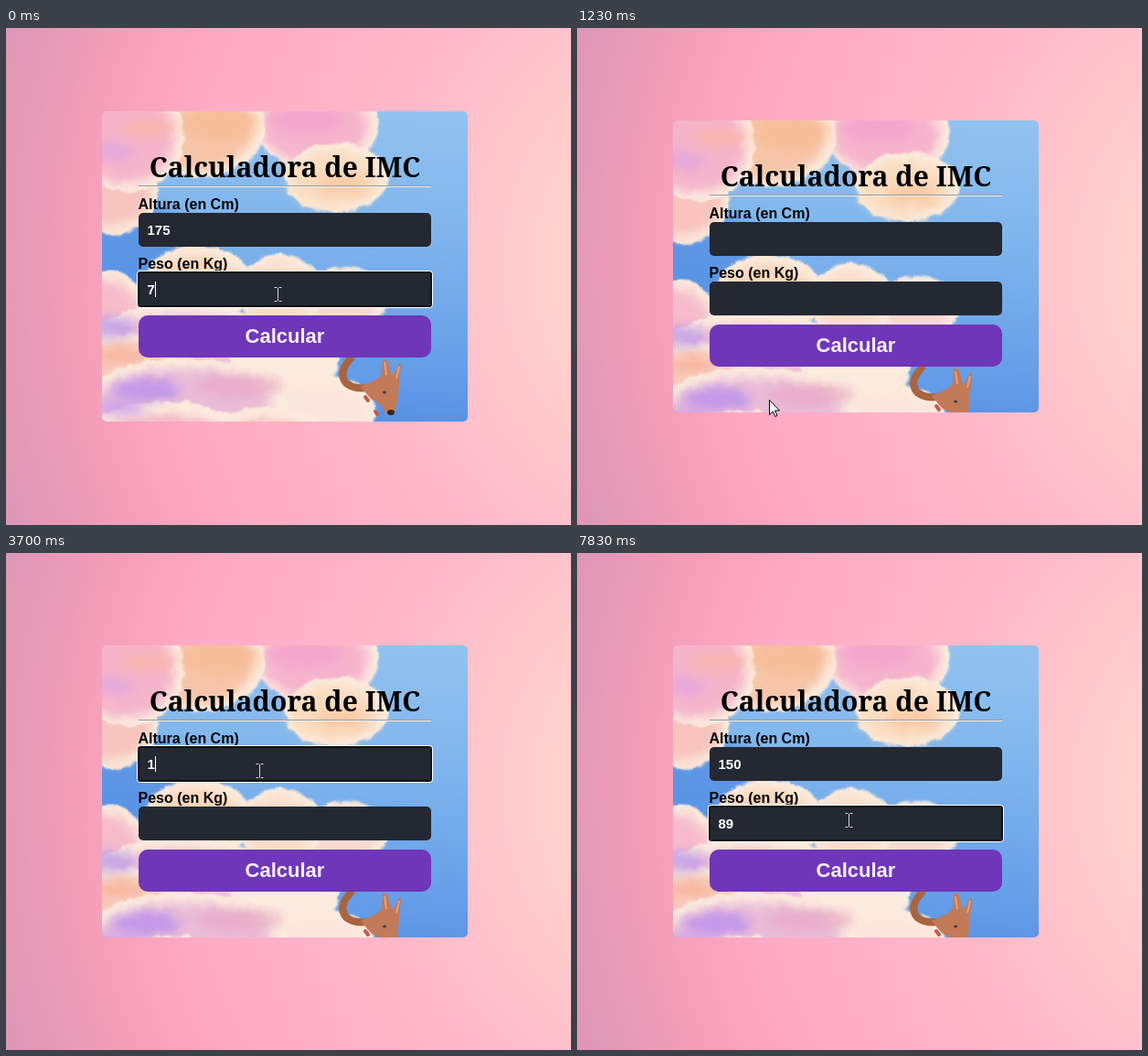
Animation, 618 px wide and 543 px high, one loop 8 s. Source, as an HTML page:

```html
<!DOCTYPE html>
<html lang="pt">
<head>
<meta charset="utf-8">
<title>Calculadora de IMC</title>
<style>
  html, body { margin: 0; width: 100%; height: 100%; overflow: hidden; }
  svg { display: block; width: 618px; height: 543px; }
  text { font: bold 16px "Liberation Sans", Arial, sans-serif; }
  .title { font: bold 30px "Noto Serif", serif; }
  .entry { font-size: 15px; fill: #fff; }
  .calc { font-size: 22px; fill: #f6f0fd; }
  .result { font-size: 20px; fill: #fff; }
  .reset { font-size: 13px; fill: #ffe9ff; }
</style>
</head>
<body>
<svg viewBox="0 0 618 543">
  <defs>
    <radialGradient id="page" gradientUnits="userSpaceOnUse" cx="800" cy="260" r="840">
      <stop offset=".2" stop-color="#ffd4d0"/>
      <stop offset=".31" stop-color="#ffcacc"/>
      <stop offset=".48" stop-color="#ffb8ca"/>
      <stop offset=".71" stop-color="#ffacc5"/>
      <stop offset=".81" stop-color="#fba2bc"/>
      <stop offset=".88" stop-color="#f09db8"/>
      <stop offset="1" stop-color="#dc97b5"/>
    </radialGradient>
    <linearGradient id="sky" x1=".8" y1="0" x2=".75" y2="1">
      <stop offset="0" stop-color="#92c2ef"/>
      <stop offset=".3" stop-color="#80b6ed"/>
      <stop offset=".7" stop-color="#629be7"/>
      <stop offset="1" stop-color="#427fdc"/>
    </linearGradient>
    <filter id="brush" x="-5%" y="-5%" width="110%" height="110%">
      <feTurbulence type="fractalNoise" baseFrequency=".07" numOctaves="3" seed="4"/>
      <feDisplacementMap in="SourceGraphic" scale="8" xChannelSelector="R" yChannelSelector="G"/>
    </filter>
    <filter id="soft" x="-40%" y="-40%" width="180%" height="180%"><feGaussianBlur stdDeviation="6"/></filter>
    <filter id="edge" x="-10%" y="-10%" width="120%" height="120%"><feGaussianBlur stdDeviation="1.2"/></filter>
    <clipPath id="frame"><rect id="frameBox" width="400" height="319" rx="5"/></clipPath>
  </defs>

  <rect width="618" height="543" fill="url(#page)"/>

  <g id="card">
    <g clip-path="url(#frame)">
      <rect width="400" height="420" fill="url(#sky)"/>
      <ellipse cx="20" cy="150" rx="90" ry="50" fill="#5590e4" opacity=".8" filter="url(#soft)"/>
      <g id="clouds" filter="url(#brush)"></g>
      <path d="M274 268Q257 285 267 297Q276 304 290 302" fill="none" stroke="#a9653f" stroke-width="8"/>
      <path d="M283 301L300 293L306 288L307 272L312 271L317 288L320 286L325 275L327 277L325 298L323 318L319 331L312 331L303 319L294 314Z" fill="#c27a58"/>
      <path d="M309 274L311 288M325 279L322 292" stroke="#e2a083" stroke-width="2"/>
      <path d="M288 312l3 4M299 328l2 3" stroke="#c75a4a" stroke-width="4" stroke-linecap="round"/>
      <ellipse cx="309" cy="307" rx="2" ry="1.5" fill="#39405a"/>
      <ellipse cx="316" cy="329" rx="4" ry="3" fill="#38251f"/>
    </g>

    <text class="title" x="200" y="72" text-anchor="middle">Calculadora de IMC</text>
    <path d="M40 81.5H360" stroke="#9a9a9a"/>
    <path d="M40 82.5H360" stroke="#eee"/>
    <text x="39.5" y="107">Altura (en Cm)</text>
    <text x="39.5" y="172">Peso (en Kg)</text>
    <g id="fields"></g>
    <rect x="40" y="223" width="320" height="46" rx="10" fill="#6f36b9"/>
    <text class="calc" x="200" y="253" text-anchor="middle">Calcular</text>
    <g id="answer">
      <rect x="40" y="279" width="320" height="50" rx="4" fill="#008000"/>
      <text class="result" x="200" y="311" text-anchor="middle">Normal: 22.86</text>
      <rect x="42" y="335" width="72" height="33" rx="4" fill="#f44bf6"/>
      <text class="reset" x="78.5" y="356" text-anchor="middle">Reiniciar</text>
    </g>
  </g>

  <g id="pointer">
    <path id="arrow" d="M.5 .5V16.5L4.2 13L6.8 18.5L9 17.5L6.5 12H11.5Z" fill="#fff" stroke="#000"/>
    <path id="hand" d="M-1.500 .5Q0-1.500 1.500 .5V6Q3 4.800 4.500 6.500Q6 5.300 7.500 7.500Q10 6.700 10.500 9V13Q10 16 8.500 19.500H.5Q-2 15-6.500 10.500Q-6 8-3.500 9.500L-1.500 11.500Z" fill="#fff" stroke="#000"/>
    <path id="beam" d="M-4-7.500H-1M1-7.500H4M-4 7.500H-1M1 7.500H4M0-7V7" fill="none" stroke="#d4d4d4"/>
  </g>
</svg>

<script>
const LOOP = 8000;
const $ = id => document.getElementById(id);

function add(parent, tag, attrs) {
  const node = document.createElementNS('http://www.w3.org/2000/svg', tag);
  for (const key in attrs) node.setAttribute(key, attrs[key]);
  return parent.appendChild(node);
}

// Cloud puffs from back to front: centre, radii, inner tint inside a pale rim.
const puffs = [
  [235, 14, 68, 50, '#f6b4cd'], [256, 72, 57, 38, '#fbdcc0'],
  [14, 84, 48, 50, '#f8c4bd'], [108, 18, 70, 54, '#f7c5a8'], [28, 26, 62, 62, '#f5b4cb'],
  [266, 204, 48, 34, '#f8d9d2'], [195, 196, 46, 40, '#fbdccb'], [105, 190, 60, 44, '#f9d6bc'],
  [4, 216, 44, 42, '#f6bccb'], [90, 262, 110, 52, '#f3c0d4'], [200, 272, 60, 40, '#fcebdf'],
  [240, 330, 60, 42, '#fbe6dd'], [22, 280, 60, 38, '#f9c8b8'], [90, 320, 112, 50, '#eabcd8'],
  [70, 385, 110, 68, '#f4b8c6'], [180, 385, 85, 62, '#f7bfbd'], [230, 405, 62, 45, '#f6cdc8'],
  [283, 404, 40, 28, '#f5cbd6'], [333, 388, 42, 34, '#fae0c9']
];
// Loose strokes of colour over the puffs.
const tints = [
  [14, 44, 22, 10, '#dfa5e2'], [50, 18, 30, 10, '#f9b8a6'], [130, 14, 42, 18, '#f6bb94'],
  [225, 8, 40, 16, '#f2a2ce'], [262, 80, 28, 10, '#f9c39c'], [10, 236, 28, 12, '#b997ec'],
  [18, 266, 28, 7, '#f7ae95'], [48, 304, 38, 12, '#b48cf0'], [150, 300, 48, 12, '#e8a9c4'],
  [20, 324, 28, 9, '#c79bf0'], [8, 396, 30, 18, '#a68cf0'], [70, 395, 36, 10, '#e9a9d8'],
  [160, 362, 48, 9, '#f5a99d'], [140, 400, 50, 9, '#f3a3bd']
];
for (const [cx, cy, rx, ry, fill] of puffs) {
  add($('clouds'), 'ellipse', { cx, cy, rx, ry, fill: '#fcecdd', filter: 'url(#edge)' });
  add($('clouds'), 'ellipse', { cx: cx - 3, cy: cy + 2, rx: rx * .87, ry: ry * .82, fill, filter: 'url(#soft)' });
}
for (const [cx, cy, rx, ry, fill] of tints)
  add($('clouds'), 'ellipse', { cx, cy, rx, ry, fill, opacity: .75, filter: 'url(#soft)' });

const fields = [111, 176].map(y => {
  const group = add($('fields'), 'g', {});
  add(group, 'rect', { x: 40, y, width: 320, height: 37, rx: 5, fill: '#242832' });
  const ring = add(group, 'g', { fill: 'none' });
  add(ring, 'rect', { x: 38.5, y: y - 1.5, width: 323, height: 40, rx: 3, stroke: '#fff' });
  add(ring, 'rect', { x: 40, y, width: 320, height: 37, rx: 2.5, stroke: '#101010', 'stroke-width': 2 });
  return {
    ring,
    entry: add(group, 'text', { class: 'entry', x: 49.5, y: y + 24 }),
    caret: add(group, 'rect', { y: y + 10, width: 1, height: 17, fill: '#fff' })
  };
});

// time, card top, card height, height entry, weight entry, focused field, caret
const states = [
  [0, 91, 339, '175', '7', 1, 1],
  [500, 54, 414, '175', '70', -1, 0],
  [630, 101, 319, '', '', -1, 0],
  [1760, 101, 319, '', '', 0, 1],
  [2230, 101, 319, '', '', 0, 0],
  [2700, 101, 319, '1', '', 0, 1],
  [3230, 101, 319, '1', '', 0, 0],
  [3700, 101, 319, '1', '', 0, 1],
  [4230, 101, 319, '15', '', 0, 1],
  [4500, 101, 319, '150', '', 0, 1],
  [5030, 101, 319, '150', '', 0, 0],
  [5500, 101, 319, '150', '', 1, 1],
  [6030, 101, 319, '150', '', 1, 0],
  [6500, 101, 319, '150', '', 1, 1],
  [6560, 101, 319, '150', '8', 1, 1],
  [7100, 101, 319, '150', '8', 1, 0],
  [7300, 101, 319, '150', '89', 1, 1],
  [7830, 101, 319, '150', '89', 1, 0]
];

// time, x, y: the pointer glides between these, sampled 15 times a second
const path = [
  [0, 297, 291], [499, 297, 291], [500, 188, 412], [630, 188, 412],
  [830, 194, 458], [1000, 202, 475], [1160, 208, 425], [1300, 216, 359],
  [1430, 250, 300], [1560, 272, 250], [1640, 277, 238], [5040, 277, 238],
  [5100, 255, 268], [5230, 138, 402], [5300, 170, 380], [5430, 297, 292], [LOOP, 297, 292]
];

function pointerAt(time) {
  const t = time < 630 ? time : Math.floor((time + 2) * .015) / .015;
  const i = Math.max(1, path.findIndex(p => p[0] > t));
  const [a, b] = [path[i - 1], path[i]];
  const k = (t - a[0]) / (b[0] - a[0]);
  return [1, 2].map(n => Math.round(a[n] + (b[n] - a[n]) * k));
}

function pointerKind(x, y, top, answer) {
  const over = (x1, y1, x2, y2) => x >= x1 + 105 && x <= x2 + 105 && y >= y1 + top && y <= y2 + top;
  if (over(40, 111, 360, 148) || over(40, 176, 360, 213)) return 'beam';
  if (over(40, 223, 360, 269) || answer && over(42, 335, 114, 368)) return 'hand';
  return 'arrow';
}

const show = (node, on) => node.setAttribute('visibility', on ? 'visible' : 'hidden');
let current;

function draw() {
  const time = performance.now() % LOOP;
  const state = states.findLast(s => s[0] <= time);
  const [, top, height, , , focus, caretOn] = state;
  const answer = height > 400;

  if (state !== current) {
    current = state;
    $('card').setAttribute('transform', `translate(105 ${top})`);
    $('frameBox').setAttribute('height', height);
    show($('answer'), answer);
    fields.forEach((field, i) => {
      const value = state[3 + i];
      field.entry.textContent = value;
      field.caret.setAttribute('x', 50 + Math.floor(value.length * 8.34));
      show(field.ring, focus === i);
      show(field.caret, focus === i && caretOn);
    });
  }

  const [x, y] = pointerAt(time);
  const kind = pointerKind(x, y, top, answer);
  for (const id of ['arrow', 'hand', 'beam']) show($(id), id === kind);
  const snap = kind === 'beam' ? .5 : 0;
  $('pointer').setAttribute('transform', `translate(${x + snap} ${y})`);
  requestAnimationFrame(draw);
}
draw();
</script>
</body>
</html>
```
